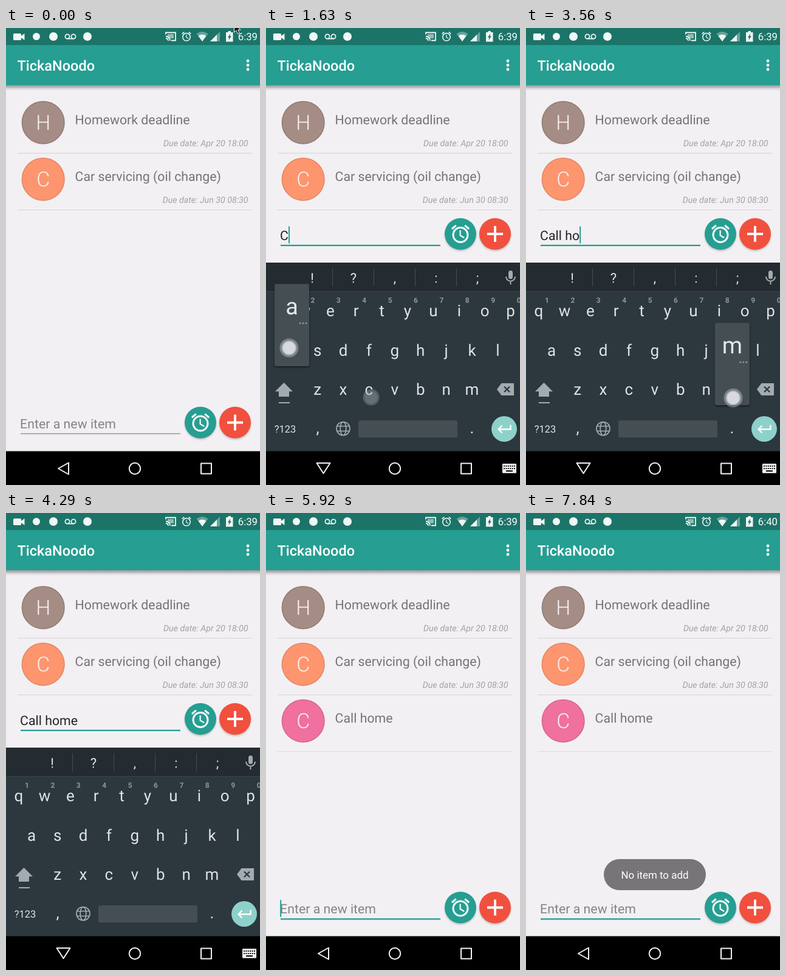
Animation of 418x750 px, one loop 7.99 s. Source, as an HTML page:

```html
<!DOCTYPE html>
<html lang="en">
<head>
<meta charset="utf-8">
<title>Todo list demo</title>
<style>
html, body { margin: 0; width: 100%; height: 100%; overflow: hidden; background: #f2f0f3; }
svg { display: block; width: 100vw; height: 100vh; }
text { font-family: Roboto, sans-serif; white-space: pre; text-rendering: geometricPrecision; }
.mid { text-anchor: middle; }
.end { text-anchor: end; }
</style>
</head>
<body>
<svg id="stage" viewBox="0 0 418 750" preserveAspectRatio="none"></svg>
<script>
const LOOP = 7990, STEPS = 54, STEP = LOOP / STEPS;
const TEAL = '#269e92';
const ROW_LIFT = 309.5, KEYS_H = 310, BODY = 21.3;

// ---------- markup helpers ----------
const text = (x, y, size, fill, str, cls = '', extra = '') =>
  `<text x="${x}" y="${y}" font-size="${size}" fill="${fill}" class="${cls}" ${extra}>${str}</text>`;
const circle = (x, y, r, fill, extra = '') =>
  `<circle cx="${x}" cy="${y}" r="${r}" fill="${fill}" ${extra}/>`;
const rect = (x, y, w, h, fill, extra = '') =>
  `<rect x="${x}" y="${y}" width="${w}" height="${h}" fill="${fill}" ${extra}/>`;
const path = (d, fill, extra = '') => `<path d="${d}" fill="${fill}" ${extra}/>`;
const line = (d, stroke, width, extra = '') =>
  path(d, 'none', `stroke="${stroke}" stroke-width="${width}" ${extra}`);
const group = (id, body, extra = '') => `<g id="${id}" ${extra}>${body}</g>`;

const alarm = (x, y, k) => `<g transform="translate(${x} ${y}) scale(${k}) translate(-12 -12)" fill="none" stroke="#f4fbfa" stroke-width="2">
  <circle cx="12" cy="13" r="8"/><path d="M2.6 6.5 7.2 2.6M21.4 6.5 16.8 2.6"/>
  <path d="M11.75 8V13.6L16.1 16.2" stroke-width="1.5"/></g>`;

// ---------- app ----------
function item(i, letter, fill, edge, title, due) {
  const y = 93 * i;
  return circle(61.2, 155.2 + y, 34.8, fill, `stroke="${edge}" stroke-width="1.5"`) +
    text(61.2, 167 + y, 34, '#f8f1ef', letter, 'mid', 'font-weight="300"') +
    text(113.6, 158 + y, BODY, '#757376', title) +
    (due ? text(398.5, 194 + y, 14.2, '#a3a1a4', 'Due date: ' + due, 'end', 'font-style="italic"') : '') +
    rect(19, 205 + y, 386, 1, due ? '#d5d3d6' : '#dfdde0');
}

const list = group('list',
  item(0, 'H', '#a58d85', '#8f7a72', 'Homework deadline', 'Apr 20 18:00') +
  item(1, 'C', '#fd956f', '#e48562', 'Car servicing (oil change)', 'Jun 30 08:30') +
  group('added', item(2, 'C', '#f0709f', '#d5658e', 'Call home')),
  'clip-path="url(#listClip)"');

const fab = (x, fill) => circle(x, 649.5, 26, '#000', 'opacity=".2" filter="url(#soft)"') + circle(x, 647.5, 26, fill);

const inputRow = group('row',
  text(23.1, 657, BODY, '#858386', 'Enter a new item', '', 'id="hint"') +
  text(23.1, 657, BODY, '#242325', '', '', 'id="typed"') +
  rect(24, 665.2, 263, 1.2, '#858386', 'id="rule"') +
  rect(23, 635, 2, 28, TEAL, 'id="caret"') +
  fab(320, TEAL) + alarm(320, 647.5, 1.5) +
  fab(377, '#f1503f') + line('M364 647.5H390M377 634.5V660.5', '#fff', 3.8));

const toolbar =
  rect(0, 94, 418, 9, 'url(#shade)') + rect(0, 28, 418, 66, TEAL) +
  text(18.4, 70, 23.5, '#fff', 'TickaNoodo', '', 'font-weight="500"') +
  [54, 61, 68].map(y => circle(398, y, 2.4, '#fff')).join('');

const W = '#f0f7f6', DIM = '#68a39b';
const statusBar = rect(0, 0, 418, 28, '#1c7469') +
  rect(12, 9, 13, 11, W, 'rx="1.5"') + path('M25 13 30.5 9V20L25 16Z', W) +
  circle(50, 14, 6, W) + circle(78, 14, 7, W) +
  circle(101, 14, 3.6, 'none', `stroke="${W}" stroke-width="1.7"`) +
  circle(111, 14, 3.6, 'none', `stroke="${W}" stroke-width="1.7"`) + line('M101 17.6H111', W, 1.7) +
  circle(134, 14, 7, W) +
  line('M263 10.5V7.5H279V20.5H272M263 13.5A7.5 7.5 0 0 1 270 21M263 17A4 4 0 0 1 267 21', W, 1.8) +
  rect(266, 10, 10, 7, W, 'opacity=".55"') +
  alarm(297, 14, .78) +
  path('M313.5 9.5Q323 2.5 332.5 9.5L323 22Z', DIM) + path('M316.5 13Q323 8.5 329.5 13L323 22Z', W) +
  path('M352 6V22H336Z', DIM) + path('M347 11V22H336Z', W) +
  path('M362 7H365.5V5H370V7H373.5V22.5H362Z', W) + path('M369.5 9 364.8 15.5H367.3L366.3 20 371 13.5H368.5Z', '#1c7469') +
  text(414, 20, 16.7, '#fff', '6:39', 'end', 'id="clock"');

// ---------- keyboard ----------
const PITCH = 42.4;
const rows = [['qwertyuiop', 21, 473], ['asdfghjkl', 42.2, 538], ['zxcvbnm', 84.6, 602]];
const keyAt = {};
rows.forEach(([chars, x0, y]) => [...chars].forEach((c, i) => keyAt[c] = [x0 + PITCH * i, y]));

const GREY = '#a2abb0';
const keyboard = group('keys',
  rect(0, 385, 418, 310, '#2c373e') + rect(0, 385, 418, 47, '#242c31') + rect(0, 432, 418, 1, '#3b464c') +
  [...'!?,:;'].map((c, i) => text(76 + 68 * i, 418, 22, '#dfe3e5', c, 'mid')).join('') +
  [0, 1, 2, 3].map(i => rect(109 + 68 * i, 394, 1, 30, '#434d52')).join('') +
  rect(399, 398, 7, 14, GREY, 'rx="3.5"') + line('M395 408A7.5 7.5 0 0 0 410 408M402.5 416V421', GREY, 2) +
  Object.entries(keyAt).map(([c, [x, y]]) => text(x, y, 26, '#dfe3e5', c, 'mid letter')).join('') +
  [...'1234567890'].map((c, i) => text(34.5 + PITCH * i, 451, 12, '#8d979d', c, 'mid', 'font-weight="700"')).join('') +
  path('M29.5 582 44 596.5H38V605H21V596.5H15Z', GREY) + rect(21, 614, 18, 2, GREY) +
  path('M380 593 387.5 583H408V603H387.5Z', GREY) + line('M392 588.5 401 597.5M401 588.5 392 597.5', '#2c373e', 2.3) +
  text(31.5, 664, 16.5, '#dfe3e5', '?123', 'mid') +
  text(85, 665, 26, '#dfe3e5', ',', 'mid') + text(339, 665, 26, '#dfe3e5', '.', 'mid') +
  `<g fill="none" stroke="${GREY}" stroke-width="1.7"><circle cx="127" cy="657.5" r="11"/>
    <ellipse cx="127" cy="657.5" rx="4.8" ry="11"/><path d="M117 653.5H137M117 661.5H137"/></g>` +
  rect(152, 644, 163, 28, '#454f53', 'rx="3" id="space"') +
  circle(392, 658, 21, '#8dd1ca') +
  line('M402.5 651.5V658.5H383M388.5 652.5 382.5 658.5 388.5 664.5', '#fff', 2.4));

const popup = group('popup',
  rect(14, 422, 57, 135, '#000', 'rx="3" opacity=".45" filter="url(#soft)"') +
  rect(14, 420, 57, 135, '#444e53', 'rx="3"') +
  text(42.5, 470, 38, '#e4e8ea', 'a', 'mid', 'id="popChar"') +
  [56, 61, 66].map(x => circle(x, 484.5, 1.5, '#8d979d')).join(''));

// ---------- system ----------
const nav = rect(0, 694.5, 418, 56, '#000') +
  `<g fill="none" stroke="#f2f2f2" stroke-width="2" stroke-linejoin="round">
    <path id="back"/><circle cx="212" cy="723" r="9.2"/><rect x="321" y="714.4" width="17" height="17"/></g>` +
  group('ime', rect(389, 715, 23, 15.5, '#f2f2f2', 'rx="1"') +
    [0, 1, 2, 3, 4, 5].map(i => rect(391 + 3.4 * i, 718, 1.9, 1.9, '#000') + rect(391 + 3.4 * i, 722, 1.9, 1.9, '#000')).join('') +
    rect(395, 726, 11, 2, '#000'));

const toast = group('toast', rect(128, 568, 168, 51, '#777577', 'rx="25.5"') +
  text(212, 600, 16.9, '#fff', 'No item to add', 'mid'));

const pointer = group('pointer', path('M0 0V14L3.4 11 6 16.5 8.6 15.3 6.2 10H10.5Z', '#111', 'stroke="#fff" stroke-width="1"'));

const svg = document.getElementById('stage');
svg.innerHTML = `<defs>
  <filter id="soft" x="-30%" y="-30%" width="160%" height="160%"><feGaussianBlur stdDeviation="1.6"/></filter>
  <linearGradient id="shade" x2="0" y2="1"><stop stop-opacity=".36"/><stop offset=".4" stop-opacity=".22"/>
    <stop offset=".6" stop-opacity=".1"/><stop offset="1" stop-opacity="0"/></linearGradient>
  <clipPath id="listClip"><rect id="listBox" y="94" width="418" height="518"/></clipPath></defs>` +
  rect(0, 0, 418, 750, '#f2f0f3') + list + inputRow + toolbar + statusBar + toast +
  keyboard + popup + nav + '<g id="dots"></g>' + pointer;

const el = {};
svg.querySelectorAll('[id]').forEach(e => el[e.id] = e);
const letters = [...svg.querySelectorAll('.letter')];
const ruler = document.createElement('canvas').getContext('2d');

// ---------- timeline, counted in steps ----------
// first step, last step, x, y, key
const taps = [
  [1, 2, 140, 650], [7, 7, 30, 600], [10, 10, 173, 606, 'c'], [11, 11, 38, 525, 'a'],
  [13, 13, 380, 532, 'l'], [15, 15, 380, 534, 'l'], [16, 16, 233, 683], [18, 19, 256, 558, 'h'],
  [22, 22, 360, 480], [24, 24, 341, 607, 'm'], [25, 25, 107, 478, 'e'],
  [33, 33, 384, 338], [37, 37, 94, 728], [49, 50, 382, 650]
];
const typedAt = [11, 12, 14, 16, 17, 20, 23, 25, 26];
const blinks = [2, 5, 8, 29, 32, 37, 40, 41, 43, 46, 50, 53];
const SPACE = 16, ADD = 34;

const clamp = v => Math.max(0, Math.min(1, v));
const passed = (times, n) => times.filter(t => t <= n).length;
const show = (e, on) => e.setAttribute('visibility', on ? 'visible' : 'hidden');
const move = (e, x, y) => e.setAttribute('transform', `translate(${x} ${y})`);

function dot([from, to, x, y], n) {
  if (n < from || n > to + 1) return '';
  return n <= to
    ? circle(x, y, 15.5, '#c9ccd6', 'opacity=".42"') + circle(x, y, 12, '#b4b7bf') + circle(x, y, 10.3, '#d8d9df')
    : circle(x, y, 13.5, '#a9b2b8', 'opacity=".32"') + circle(x, y, 10.5, '#a9b2b8', 'opacity=".2"');
}

function draw(n) {
  // keyboard slides in over steps 2-4 and out over 37-40
  const open = n < 20 ? clamp((n - 2) / 2) : 1 - clamp((n - 37) / 2.6);
  const lifted = n >= 3 && n < 38;
  move(el.keys, 0, KEYS_H * (1 - open) ** 1.5);
  show(el.keys, open > 0);
  move(el.row, 0, lifted ? -ROW_LIFT : 0);
  el.listBox.setAttribute('height', lifted ? 218 : 528);
  el.back.setAttribute('d', lifted ? 'M83.5 714H105.5L94.5 731Z' : 'M86 723 103 713.5V732.5Z');
  show(el.ime, lifted);

  const typed = n < ADD ? 'Call home'.slice(0, passed(typedAt, n)) : '';
  el.typed.textContent = typed;
  show(el.hint, !typed);
  show(el.added, n >= ADD);
  ruler.font = `${BODY}px Roboto, sans-serif`;
  el.caret.setAttribute('x', 23.2 + ruler.measureText(typed).width);
  show(el.caret, passed(blinks, n) % 2);

  const focus = n >= 2;
  el.rule.setAttribute('fill', focus ? TEAL : '#858386');
  el.rule.setAttribute('height', focus ? 2.3 : 1.2);

  const upper = n >= 8 && n < 11;
  letters.forEach(e => {
    const c = e.textContent;
    e.textContent = upper ? c.toUpperCase() : c.toLowerCase();
  });
  el.space.setAttribute('fill', n === SPACE ? '#5d676b' : '#454f53');

  const hit = taps.find(([, to, , , key]) => key && to === n);
  show(el.popup, hit);
  if (hit) {
    const [x, y] = keyAt[hit[4]];
    move(el.popup, x - 42.2, y - 538);
    el.popChar.textContent = upper ? hit[4].toUpperCase() : hit[4];
  }

  el.dots.innerHTML = taps.map(t => dot(t, n)).join('');
  el.clock.textContent = n < 48 ? '6:39' : '6:40';
  el.toast.setAttribute('opacity', clamp((n - 50) / 2));
  show(el.toast, n > 50);
  move(el.pointer, 375.5 + Math.min(n, 5) * .2, -7 - Math.min(n, 5) * 1.5);
  show(el.pointer, n < 9);
}

let last = -1;
const start = performance.now();
function tick() {
  const t = (performance.now() - start) % LOOP;
  const n = Math.floor((t + 6) / STEP) % STEPS;
  if (n !== last) draw(last = n);
  requestAnimationFrame(tick);
}
tick();
</script>
</body>
</html>
```
